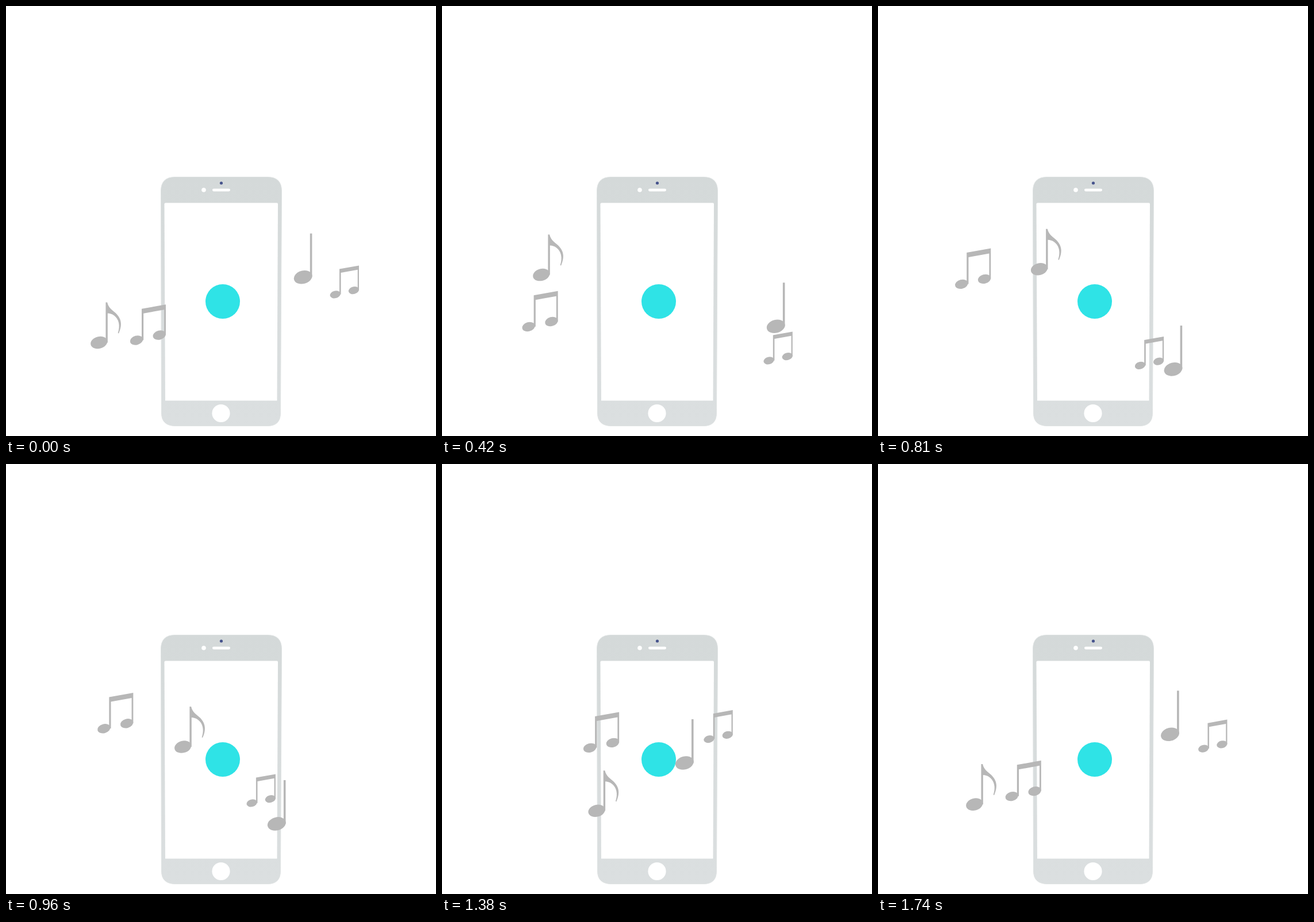
These frames come from a looping animation (748 by 748 pixels, 1.77 s). An HTML page:

```html
<!DOCTYPE html>
<html lang="en">
<head>
<meta charset="utf-8">
<title>Phone with circling notes</title>
<style>
  html, body { margin: 0; width: 100%; height: 100%; overflow: hidden; background: #fff; }
  svg { display: block; width: 748px; height: 748px; }
  .notes { fill: #b7b7b7; }
</style>
</head>
<body>
<svg viewBox="0 0 748 748">
  <defs>
    <linearGradient id="body" x1="0" y1="0" x2="0" y2="1">
      <stop offset="0" stop-color="#d4d9d9"/>
      <stop offset="1" stop-color="#dbdfe0"/>
    </linearGradient>
    <g id="pair">
      <path d="M-42 7.500L0 0V53H-2.800V9L-38.800 15.500V62H-42Z"/>
      <ellipse rx="11.400" ry="7.900" transform="translate(-51 62.300) rotate(-15)"/>
      <ellipse rx="11.400" ry="7.900" transform="translate(-11.200 53.300) rotate(-15)"/>
    </g>
  </defs>

  <g id="phone">
    <path fill="url(#body)" stroke="#dfe3e3" d="M294 297.500H455Q479.500 297.500 479.500 322L477.500 708Q477.500 730.500 455 730.500H295Q270.500 730.500 270.500 708L269.500 322Q269.500 297.500 294 297.500Z"/>
    <path fill="#fff" d="M277.500 342.500H471Q473 342.500 473 344.500L471.500 686.500H277L275.500 344.500Q275.500 342.500 277.500 342.500Z"/>
    <circle cx="374.500" cy="308" r="2.600" fill="#46538c"/>
    <circle cx="344" cy="320" r="3.800" fill="#fff"/>
    <rect x="359" y="317.800" width="31" height="4.600" rx="2.300" fill="#fff"/>
    <circle cx="374" cy="708.500" r="15.600" fill="#fff"/>
    <circle cx="377" cy="514" r="30" fill="#2fe3e6"/>
  </g>

  <g class="notes">
    <g id="eighth">
      <path d="M-1.700 0H1C3 9 9 13 16 19C25 28 28 38 21 54L19.500 53.500C24 40 21 29 13 23C9 20 5 19 1.700 19V70H-1.700Z"/>
      <ellipse rx="14.800" ry="10.400" transform="translate(-13.400 70) rotate(-15)"/>
    </g>
    <g id="quarter">
      <path d="M-1.700 0H1.900V76H-1.700Z"/>
      <ellipse rx="16.200" ry="11.400" transform="translate(-13.800 76) rotate(-15)"/>
    </g>
    <g id="bigPair"><use href="#pair"/></g>
    <g id="smallPair"><use href="#pair" transform="scale(.81)"/></g>
  </g>
</svg>
<script>
  const LOOP = 1770, STEP = 30;

  // Uneven orbits: [centre, cos, sin, cos of double angle, sin of double angle]
  const orbits = {
    eighth:    { x: [243, -67.3, -52.2, -.55, -.2],   y: [458.8, 56.25, -65.5, .4, -.1] },
    quarter:   { x: [515.5, 12.3, 81, 2.7, -.1],      y: [474.5, -80.1, 14.2, 1.3, 1.5] },
    bigPair:   { x: [246.5, 35.5, -51.5, -4, -2],     y: [459.6, 55.4, 36.6, 4.2, -4.3] },
    smallPair: { x: [548, 66.7, 55.8, -.7, 1.1],      y: [504.6, -53.9, 67.1, .7, -.2] }
  };

  const at = ([c, a, b, p, q], w) =>
    c + a * Math.cos(w) + b * Math.sin(w) + p * Math.cos(2 * w) + q * Math.sin(2 * w);

  function draw() {
    const t = Math.floor(performance.now() % LOOP / STEP) * STEP;
    const angle = 2 * Math.PI * t / LOOP;
    for (const [id, { x, y }] of Object.entries(orbits)) {
      document.getElementById(id)
        .setAttribute('transform', `translate(${at(x, angle).toFixed(2)} ${at(y, angle).toFixed(2)})`);
    }
    requestAnimationFrame(draw);
  }
  draw();
</script>
</body>
</html>
```
